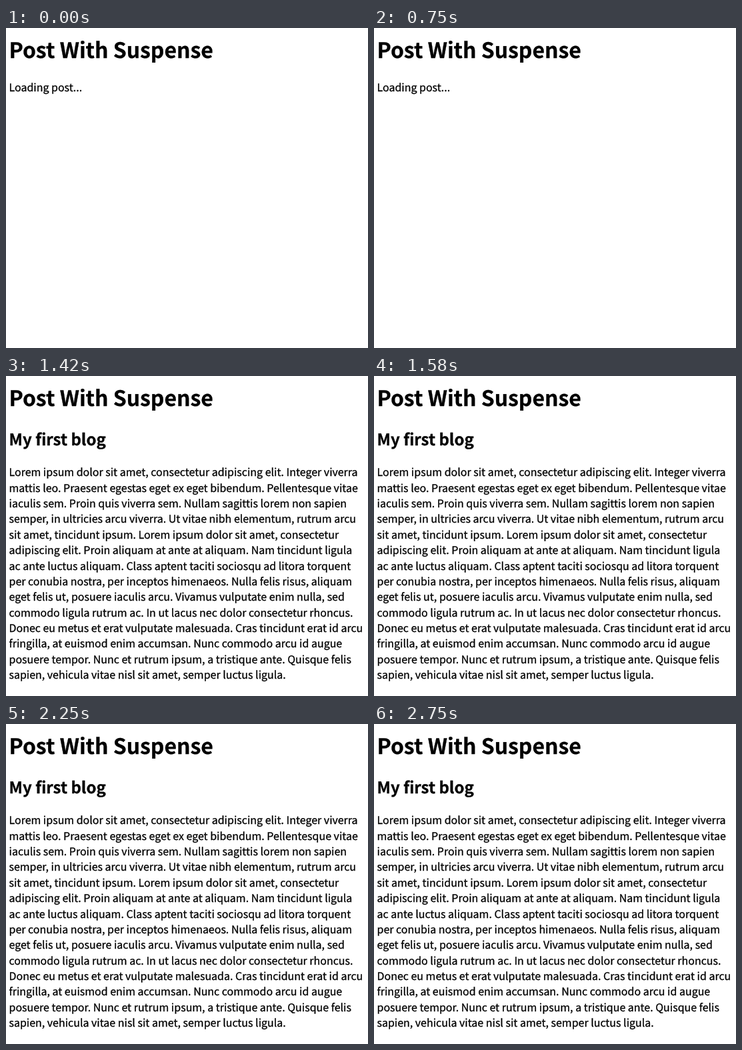
An HTML page for the animation above (2.83 s loop, 543 by 480 pixels).

```html
<!DOCTYPE html>
<html lang="en">
<head>
<meta charset="utf-8">
<title>Post With Suspense</title>
<style>
  html, body { margin: 0; width: 100%; height: 100%; overflow: hidden; background: #fff; }
  svg { display: block; width: 543px; height: 480px; }
  text {
    font-family: "Noto Sans CJK JP", "Noto Sans CJK SC", "Noto Sans CJK", sans-serif;
    font-size: 15.98px;
    fill: #000;
    stroke: #000;
    stroke-width: 0.3px; /* slightly heavier glyphs, as with font smoothing */
    text-rendering: geometricPrecision;
  }
  .title { font-size: 31.96px; font-weight: 700; }
  .subtitle { font-size: 23.97px; font-weight: 700; }
</style>
</head>
<body>
<svg viewBox="0 0 543 480">
  <text class="title" x="4.5" y="44.5">Post With Suspense</text>
  <text id="loading" x="4.5" y="94.8">Loading post...</text>
  <g id="post" visibility="hidden">
    <text class="subtitle" x="4.5" y="104.2">My first blog</text>
  </g>
</svg>
<script>
const LOOP = 2830, LOADED_AT = 1420;
const LEFT = 4.5, FIRST_BASELINE = 150.3, LINE_HEIGHT = 23.38;

const lines = `Lorem ipsum dolor sit amet, consectetur adipiscing elit. Integer viverra
mattis leo. Praesent egestas eget ex eget bibendum. Pellentesque vitae
iaculis sem. Proin quis viverra sem. Nullam sagittis lorem non sapien
semper, in ultricies arcu viverra. Ut vitae nibh elementum, rutrum arcu
sit amet, tincidunt ipsum. Lorem ipsum dolor sit amet, consectetur
adipiscing elit. Proin aliquam at ante at aliquam. Nam tincidunt ligula
ac ante luctus aliquam. Class aptent taciti sociosqu ad litora torquent
per conubia nostra, per inceptos himenaeos. Nulla felis risus, aliquam
eget felis ut, posuere iaculis arcu. Vivamus vulputate enim nulla, sed
commodo ligula rutrum ac. In ut lacus nec dolor consectetur rhoncus.
Donec eu metus et erat vulputate malesuada. Cras tincidunt erat id arcu
fringilla, at euismod enim accumsan. Nunc commodo arcu id augue
posuere tempor. Nunc et rutrum ipsum, a tristique ante. Quisque felis
sapien, vehicula vitae nisl sit amet, semper luctus ligula.`.split("\n");

const loading = document.getElementById("loading");
const post = document.getElementById("post");

lines.forEach((line, i) => {
  const text = document.createElementNS(post.namespaceURI, "text");
  text.setAttribute("x", LEFT);
  text.setAttribute("y", FIRST_BASELINE + i * LINE_HEIGHT);
  text.textContent = line;
  post.append(text);
});

const show = (node, visible) =>
  node.setAttribute("visibility", visible ? "visible" : "hidden");

const start = performance.now();
function draw() {
  const loaded = (performance.now() - start) % LOOP >= LOADED_AT;
  show(loading, !loaded);
  show(post, loaded);
  requestAnimationFrame(draw);
}
draw();
</script>
</body>
</html>
```
